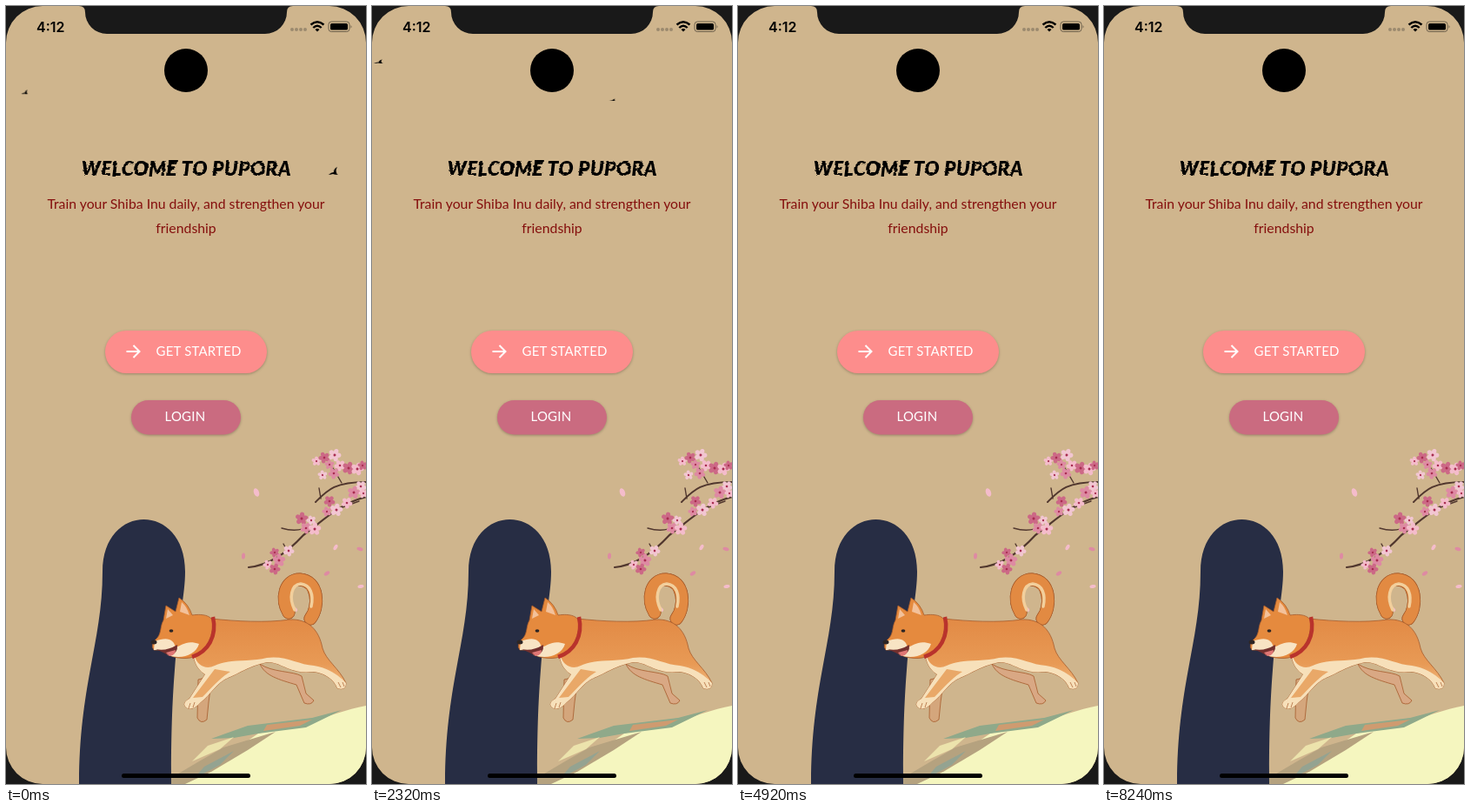
An HTML page that plays this animation: 414 px wide and 894 px high, repeating every 8.28 s.

```html
<!DOCTYPE html>
<html lang="en">
<head>
<meta charset="utf-8">
<title>Welcome screen</title>
<style>
html, body { margin: 0; width: 100%; height: 100%; overflow: hidden; background: #191919; }
svg { display: block; width: 414px; height: 894px; }
text { font-family: Lato, sans-serif; }
.time { font: 600 16px Inter, sans-serif; }
.title { font-size: 22.4px; font-weight: 900; font-style: italic; letter-spacing: .5px; }
.intro { font-size: 15.8px; fill: #850f0d; }
.label { font-size: 15px; letter-spacing: .2px; fill: #fff; }
.button { filter: drop-shadow(0 1px 1.5px #0004); }
.bird { animation: 8280ms linear infinite; }
.flap { animation: flap 360ms ease-in-out infinite; }
.low { animation-name: low; }
.small { animation-name: small; }
.rising { animation-name: rising; }
.fast { animation-name: fast; }
@keyframes flap { 50% { transform: scaleY(.5); } }
@keyframes low {
  0% { transform: translate(376px, 190px); }
  11.11% { transform: translate(219px, 135px); }
  28.02% { transform: translate(7px, 64px); }
  30% { transform: translate(-17px, 56px); }
  30.01%, 59.6% { transform: translate(430px, 209px); }
  71.01% { transform: translate(266px, 152px); }
  85.99% { transform: translate(50px, 77px); }
  91.8%, 100% { transform: translate(-34px, 48px); }
}
@keyframes small {
  0% { transform: translate(21px, 99px); }
  11.11% { transform: translate(126px, 125px); }
  28.02% { transform: translate(276px, 108px); }
  45.4%, 100% { transform: translate(430px, 70px); }
}
@keyframes rising {
  0%, 7.5% { transform: translate(-15px, 195px); }
  11.11% { transform: translate(65px, 181px); }
  27.8%, 100% { transform: translate(430px, 130px); }
}
@keyframes fast {
  0%, 66.9% { transform: translate(430px, 116px); }
  71.01% { transform: translate(339px, 117px); }
  85.99% { transform: translate(5px, 120px); }
  87.2%, 100% { transform: translate(-20px, 120px); }
}
</style>
</head>
<body>
<svg viewBox="0 0 414 894">
  <defs>
    <clipPath id="screen">
      <path d="M0 42A42 42 0 0 1 42 0H84Q91 0 91 7A25 25 0 0 0 116 32H298A25 25 0 0 0 323 7Q323 0 330 0H372A42 42 0 0 1 414 42V852A42 42 0 0 1 372 894H42A42 42 0 0 1 0 852Z"/>
    </clipPath>
    <filter id="brush" x="-5%" y="-30%" width="110%" height="160%">
      <feTurbulence type="fractalNoise" baseFrequency=".1 .25" numOctaves="2" seed="4"/>
      <feDisplacementMap in="SourceGraphic" scale="3" xChannelSelector="R" yChannelSelector="G"/>
    </filter>
    <linearGradient id="fur" x2="0" y2="1">
      <stop offset="0" stop-color="#e28a45"/>
      <stop offset=".5" stop-color="#e89a55"/>
      <stop offset="1" stop-color="#f3d3a6"/>
    </linearGradient>
    <path id="wings" d="M-5 4Q-2 1 1 1Q1 -3 5 -5Q3 -1 4 1Q4 3 6 4Q2 4 0 3Q-3 4 -5 4Z"/>
    <g id="flower">
      <g id="petals"></g>
      <circle r="1.5" fill="#a82c50"/>
    </g>
  </defs>

  <g clip-path="url(#screen)">
    <rect width="414" height="894" fill="#cfb58d"/>

    <!-- Hill -->
    <path d="M414 804C392 808 370 817 345 823L290 836L252 862L188 894H414Z" fill="#f5f6bf"/>
    <path d="M236 842L278 827L352 818L386 809L345 829L290 836L262 841Z" fill="#8fa98a"/>
    <path d="M300 826L352 820L338 827L296 833Z" fill="#cf9b70"/>
    <path d="M232 850L262 840L246 854L214 868Z" fill="#ece3ac"/>
    <path d="M178 894L222 868L250 852L310 834L278 855L236 880L206 894Z" fill="#b5a27f"/>
    <path d="M262 856L246 872L216 888L228 874Z" fill="#94a391"/>

    <!-- Figure -->
    <path d="M84 894C84 780 111 730 111 650C111 570 206 570 206 650C206 690 189 730 190 894Z" fill="#272d44"/>

    <!-- Cherry branch -->
    <g fill="none" stroke="#51372e" stroke-linecap="round">
      <path d="M279 645C300 643 320 632 342 608C362 594 382 572 414 564" stroke-width="2.2"/>
      <path d="M356 570C370 556 378 547 414 547" stroke-width="2"/>
      <path d="M317 600C330 604 342 602 350 597M362 566L360 554M386 548L376 531M384 577L406 569M324 627L319 618" stroke-width="1.4"/>
    </g>
    <g id="blossom"></g>

    <!-- Dog -->
    <g stroke="#a65b2b" stroke-width=".8" stroke-linejoin="round">
      <path d="M221 774L237 770L233 800L231 820Q224 826 220 818Z" fill="#d4a67c"/>
      <path d="M292 756C306 766 330 764 340 770L345 790L354 798Q351 804 343 801L334 780C314 774 298 770 292 756Z" fill="#d9a884"/>
    </g>
    <g fill="none" stroke-linecap="round">
      <path id="tail" d="M350 704C361 690 359 660 338 659C320 659 316 682 325 697" stroke="#a65b2b" stroke-width="15"/>
      <use href="#tail"/>
      <path d="M350 704C361 690 359 660 338 659C320 659 316 682 325 697" stroke="#e28a42" stroke-width="13.6"/>
      <path d="M351 690C354 676 350 665 339 664C328 665 325 680 332 694" stroke="#f2cf9c" stroke-width="3.5"/>
    </g>
    <g stroke="#a65b2b" stroke-width=".8" stroke-linejoin="round">
      <path d="M236 704C264 707 300 709 326 705C348 704 360 717 364 738C368 752 383 761 391 778Q391 787 381 784C377 772 362 765 352 765C326 768 316 753 300 754C280 758 266 768 253 773C243 778 235 791 224 800Q213 812 206 805Q203 800 211 796L229 768C219 762 217 753 215 745Z" fill="url(#fur)"/>
      <path d="M217 747C220 758 230 763 240 758C255 750 280 754 300 749C322 746 336 757 354 758C370 760 384 770 391 778Q391 787 381 784C377 772 362 765 352 765C326 768 316 753 300 754C280 758 266 768 253 773C243 778 235 791 224 800Q213 812 206 805Q203 800 211 796L229 768C219 762 217 753 215 745Z" fill="#f7e0ba" stroke="none"/>
      <path d="M240 762L258 765C246 772 236 784 226 794L215 795Z" fill="#e9a868" stroke="none"/>
      <path d="M181 706L184 689L195 696L199 680Q210 687 214 700C228 698 238 701 238 710C237 730 227 744 212 749C199 751 184 747 181 740L170 740Q165 733 174 726C179 720 177 713 181 706Z" fill="#e58a3e"/>
    </g>
    <path d="M171 730C186 724 193 728 195 737C202 735 208 728 222 733C218 746 202 751 186 746L181 740L170 740Z" fill="#f8e4c4"/>
    <path d="M200 696L202 685Q208 690 211 700ZM184 704L186 693L192 700Z" fill="#f3c19a"/>
    <path d="M172 739Q184 742 197 734Q198 744 188 747L181 743Z" fill="#72302e"/>
    <path d="M184 743L195 740Q195 746 188 747Z" fill="#df7775"/>
    <ellipse cx="170" cy="731" rx="3.5" ry="2.5" fill="#2d2524"/>
    <ellipse cx="190" cy="718" rx="2.4" ry="1.8" fill="#2d2524"/>
    <path d="M238 702C243 725 232 742 214 748" fill="none" stroke="#b9332c" stroke-width="4.5"/>
    <path d="M382 777l3 6M387 777l2 5M212 801l-2 6M217 800l-2 6" stroke="#a65b2b" stroke-width=".7"/>

    <!-- Birds -->
    <g class="bird low"><g class="flap"><use href="#wings"/></g></g>
    <g class="bird small"><g class="flap"><use href="#wings" transform="scale(.7 .55)"/></g></g>
    <g class="bird rising"><g class="flap"><use href="#wings" transform="scale(-1 1)"/></g></g>
    <g class="bird fast"><g class="flap"><use href="#wings" transform="scale(.7 .4)"/></g></g>

    <!-- Status bar -->
    <text class="time" x="35" y="29.5">4:12</text>
    <g fill="#9b8a6e">
      <circle cx="329" cy="27" r="2"/><circle cx="334" cy="27" r="2"/>
      <circle cx="339" cy="27" r="2"/><circle cx="344" cy="27" r="2"/>
    </g>
    <path d="M350.5 21.5Q358 15 365.5 21.5M353.3 25Q358 20.5 362.7 25" fill="none" stroke="#000" stroke-width="2.4"/>
    <path d="M355.5 27Q358 25 360.5 27L358 29.5Z"/>
    <rect x="371" y="18" width="24" height="11.5" rx="3.2" fill="none" stroke="#6f624d"/>
    <rect x="373" y="20" width="20" height="7.5" rx="1.6"/>
    <path d="M396.5 22Q398.5 23.8 396.5 25.6Z" fill="#6f624d"/>

    <circle cx="207" cy="74" r="25"/>
    <text class="title" x="207.5" y="195" text-anchor="middle" filter="url(#brush)">WELCOME TO PUPORA</text>
    <g class="intro" text-anchor="middle">
      <text x="207" y="233">Train your Shiba Inu daily, and strengthen your</text>
      <text x="207" y="261">friendship</text>
    </g>

    <rect class="button" x="114" y="373" width="186" height="49" rx="24.5" fill="#fd8d8c"/>
    <path d="M138.5 397H153M146.5 390L153.5 397L146.5 404" fill="none" stroke="#fff" stroke-width="2"/>
    <text class="label" x="172.5" y="402">GET STARTED</text>
    <rect class="button" x="144" y="453" width="126" height="39.5" rx="19.7" fill="#ca6b80"/>
    <text class="label" x="182.5" y="477">LOGIN</text>

    <rect x="133" y="882" width="148" height="5" rx="2.5"/>
  </g>
</svg>
<script>
const add = (parent, tag, attrs) => {
  const node = document.createElementNS('http://www.w3.org/2000/svg', tag);
  for (const key in attrs) node.setAttribute(key, attrs[key]);
  parent.append(node);
};
const byId = id => document.getElementById(id);

for (let i = 0; i < 5; i++) {
  add(byId('petals'), 'ellipse', { cy: -4, rx: 2.7, ry: 3.5, transform: `rotate(${i * 72})` });
}

const blossom = byId('blossom');
const flowers = [
  [357, 523], [366, 519], [378, 516], [372, 527], [384, 528], [394, 531], [364, 539], [377, 537],
  [404, 532], [410, 528], [408, 552], [400, 559], [411, 560],
  [372, 569], [380, 579], [369, 581], [392, 571],
  [340, 589], [351, 591], [345, 600], [355, 601],
  [309, 628], [325, 626], [314, 637], [301, 642], [309, 647]
];
const pinks = ['#f4bccb', '#de8aa3', '#f2c6d2', '#cc6886'];
flowers.forEach(([x, y], i) => add(blossom, 'use', {
  href: '#flower',
  fill: pinks[i * 3 % 4],
  transform: `translate(${x} ${y}) rotate(${i * 47}) scale(${0.75 + i % 3 * 0.12})`
}));

const loose = [[288, 559], [273, 632], [379, 622], [369, 652], [408, 667], [407, 624], [332, 693]];
loose.forEach(([x, y], i) => add(blossom, 'ellipse', {
  rx: i ? 2 : 3, ry: i ? 3.6 : 5, fill: pinks[i % 2],
  transform: `translate(${x} ${y}) rotate(${i * 25 - 20})`
}));
</script>
</body>
</html>
```
